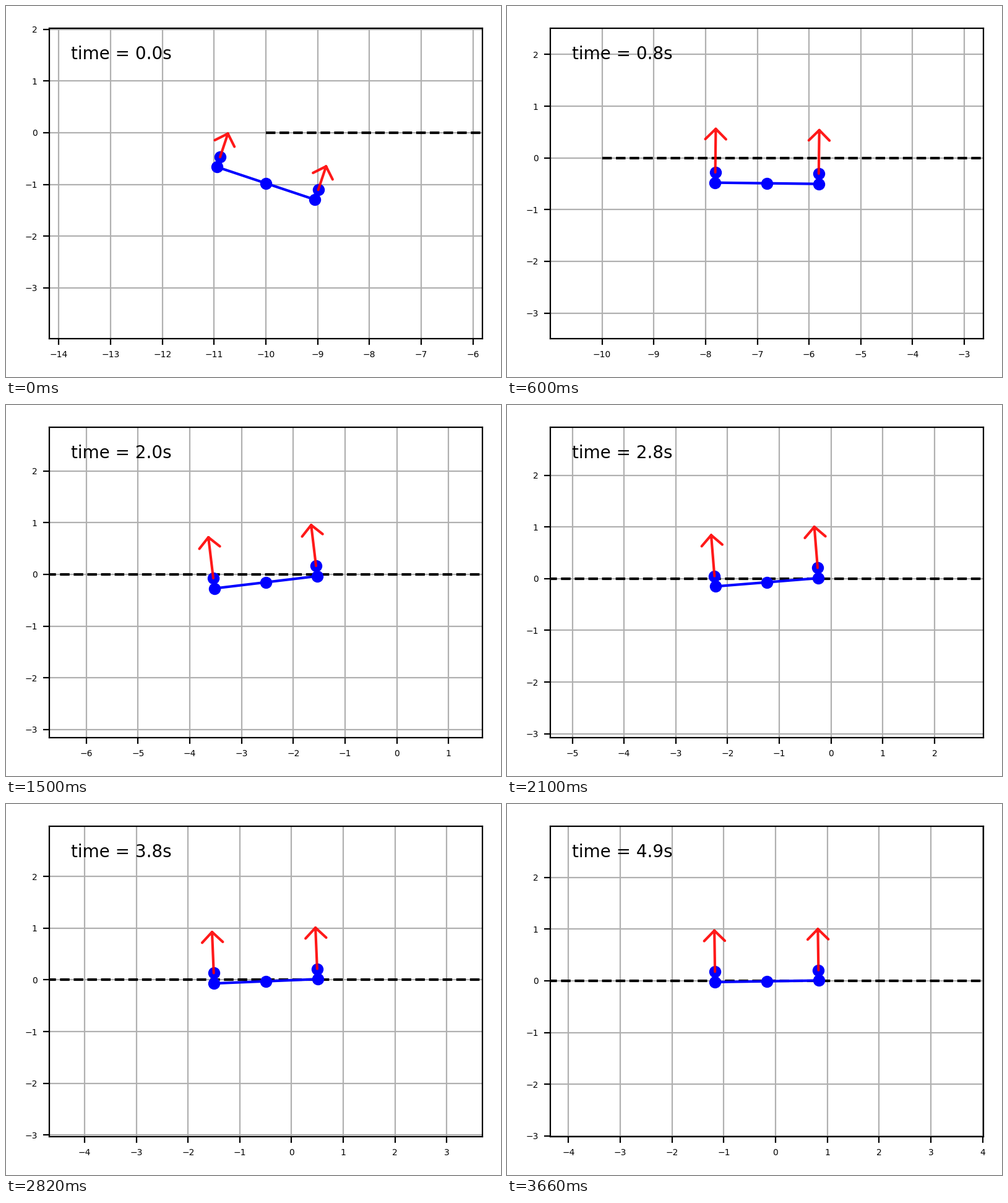
A matplotlib script for the animation above (3.72 s loop, 800 px wide and 600 px high).

```python
import numpy as np
import matplotlib.pyplot as plt
from matplotlib.animation import FuncAnimation
from matplotlib.ticker import MultipleLocator

W, H, DPI = 800, 600, 200
FRAMES, INTERVAL, DURATION = 62, 60, 5.0
G = 9.8
HALF_H = 3.0
LEFT, BOTTOM, WIDTH, HEIGHT = 70, 62.4, 700, 501.8
UNIT = HEIGHT / (2 * HALF_H)      # pixels per data unit
HALF_W = WIDTH / UNIT / 2
ARM, MAST, BARB = 1.0, 0.2, 16.7 / UNIT

T_LEVEL = 10 * DURATION / FRAMES  # body passes level, fastest flight
T_TAIL = 25 * DURATION / FRAMES   # smooth approach begins


def quintic(h, start, end):
    """Polynomial joining two (position, velocity, acceleration) states."""
    x0, v0, a0 = start
    x1, v1, a1 = end
    rest = [x1 - x0 - v0 * h - a0 * h**2 / 2, v1 - v0 - a0 * h, a1 - a0]
    m = [[h**3, h**4, h**5],
         [3 * h**2, 4 * h**3, 5 * h**4],
         [6 * h, 12 * h**2, 20 * h**3]]
    return np.polynomial.Polynomial([x0, v0, a0 / 2, *np.linalg.solve(m, rest)])


LEVEL_STATE = (-6.815, 5.7, 0.12)
SPEED_UP = quintic(T_LEVEL, (-10, 0.1, 3.27), LEVEL_STATE)
SLOW_DOWN = quintic(T_TAIL - T_LEVEL, LEVEL_STATE, (-2.531, 2.07, -1.17))


def pose(t):
    """Position and tilt of the craft."""
    y = -1.069 * np.exp(-0.965 * t) + 0.091 * np.exp(-8 * t)
    if t < T_TAIL:
        path, u = (SPEED_UP, t) if t < T_LEVEL else (SLOW_DOWN, t - T_LEVEL)
        return path(u), y, -np.arctan(path.deriv(2)(u) / G)
    u = t - T_TAIL
    x = -19.57 * np.exp(-0.968 * t) + 0.25 * np.exp(-2.5 * u)
    return x, y, 0.119 * np.exp(-0.40 * u - 0.11 * u**2)


def thrust(t):
    return (0.795 + 0.045 * np.exp(-((t - 0.8) / 0.5) ** 2)
            - 0.32 * np.exp(-t / 0.08))


fig = plt.figure(figsize=(W / DPI, H / DPI), dpi=DPI, facecolor="white")
ax = fig.add_axes([LEFT / W, BOTTOM / H, WIDTH / W, HEIGHT / H])
ax.tick_params(labelsize=5)
ax.xaxis.set_major_locator(MultipleLocator(1))
ax.yaxis.set_major_locator(MultipleLocator(1))
ax.grid(True)

ax.plot([-10, 10], [0, 0], "k--", lw=1.5)
body, = ax.plot([], [], "bo-", lw=1.5, ms=6)
arrows = [ax.plot([], [], color="red", alpha=0.9, lw=1.5, zorder=4,
                  solid_capstyle="round", solid_joinstyle="round")[0]
          for _ in range(2)]
label = ax.text(0.05, 0.9, "", transform=ax.transAxes, fontsize=10)


def draw(i):
    t = i * DURATION / FRAMES
    x, y, tilt = pose(t)
    center = np.array([x, y])
    along = np.array([np.cos(tilt), np.sin(tilt)])
    up = np.array([-np.sin(tilt), np.cos(tilt)])

    ends = [center - ARM * along, center + ARM * along]
    props = [end + MAST * up for end in ends]
    body.set_data(*np.array([props[0], ends[0], center, ends[1], props[1]]).T)

    for arrow, prop in zip(arrows, props):
        tip = prop + thrust(t) * up
        back = tip - BARB * up
        arrow.set_data(*np.array([prop, tip, [np.nan, np.nan],
                                  back - BARB * along, tip,
                                  back + BARB * along]).T)

    label.set_text(f"time = {t:.1f}s")
    ax.set_xlim(x - HALF_W, x + HALF_W)
    ax.set_ylim(y - HALF_H, y + HALF_H)
    return [body, *arrows, label]


anim = FuncAnimation(fig, draw, frames=FRAMES, interval=INTERVAL,
                     repeat=True, repeat_delay=0, blit=False)
plt.show()
```
